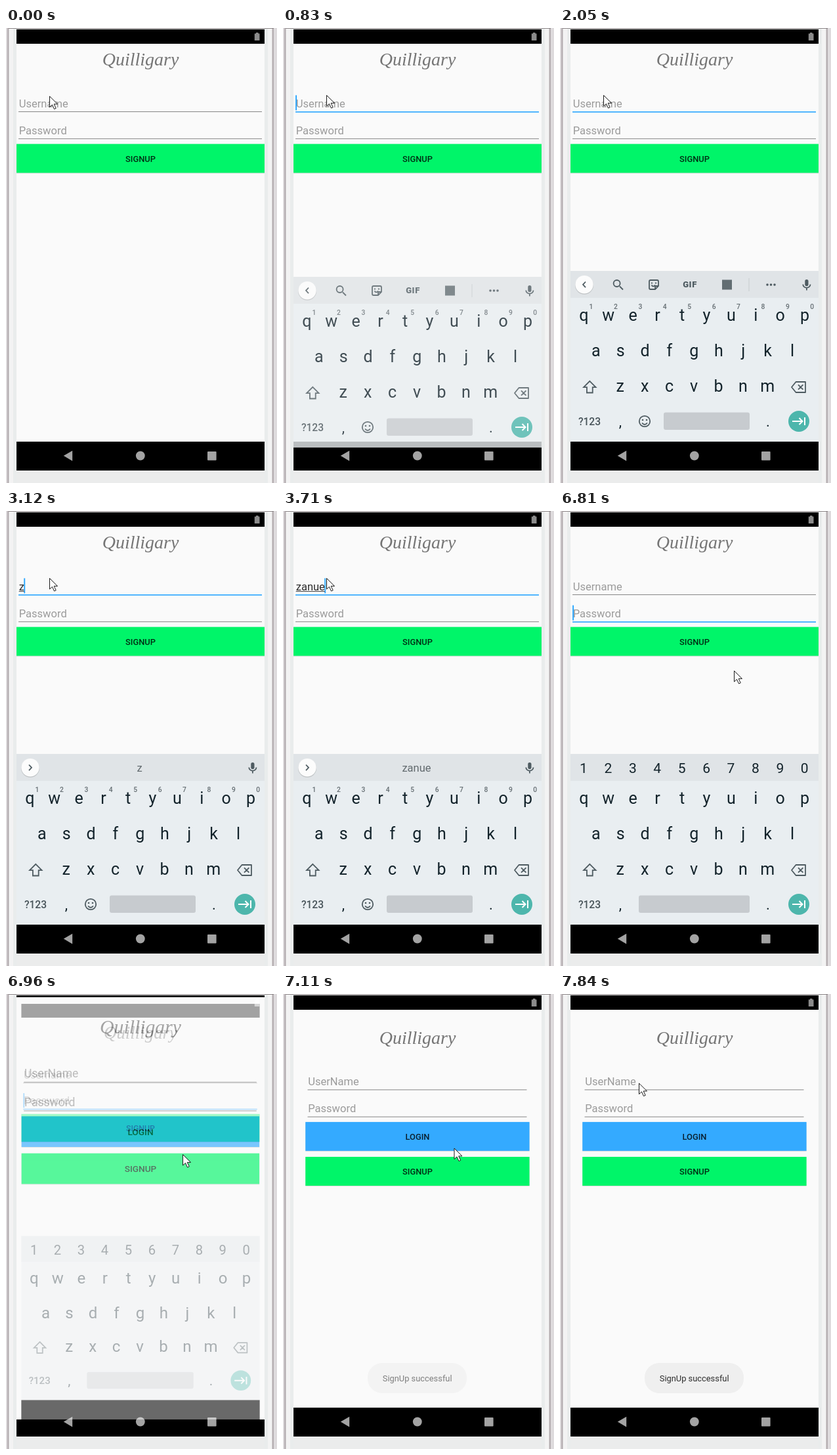
Animation, 413 px wide and 693 px high, one loop 7990 ms. Source, as an HTML page:

```html
<!DOCTYPE html>
<html lang="en">
<head>
<meta charset="utf-8">
<title>Sign-up flow</title>
<style>
  html, body { margin: 0; width: 100%; height: 100%; overflow: hidden; background: #f2f2f2; }
  svg { display: block; width: 100%; height: 100%; }
  text { font-family: Roboto, sans-serif; white-space: pre; }
  .mid { text-anchor: middle; }
  .medium { font-weight: 500; }
  .title { font: italic 28px "Liberation Serif", serif; }
  .icon { fill: none; stroke: #4e5b61; stroke-width: 1.8; }
</style>
</head>
<body>
<svg id="stage" viewBox="0 0 413 693"></svg>
<script>
const LOOP = 7990;
const ACCENT = '#34aaff', GREEN = '#00f569', PAPER = '#fafafa', INK = '#13232b', ICON = '#4e5b61';
const USER = 'zanue';
const FIELD_SIZE = 16.54, LEFT = 19.7;

const rect = (x, y, w, h, fill, more = '') =>
  `<rect x="${x}" y="${y}" width="${w}" height="${h}" fill="${fill}" ${more}/>`;
const text = (x, y, str, size, fill, more = '') =>
  `<text x="${x}" y="${y}" font-size="${size}" fill="${fill}" ${more}>${str}</text>`;
const mid = (x, y, str, size, fill, cls = '', more = '') =>
  text(x, y, str, size, fill, `class="mid ${cls}" ${more}`);
const dot = (x, y, r, fill) => `<circle cx="${x}" cy="${y}" r="${r}" fill="${fill}"/>`;
const icon = (d, more = '') => `<path class="icon" d="${d}" ${more}/>`;
const group = (id, body) => `<g id="${id}">${body}</g>`;

// Phone body
function phone() {
  const bands = [[0, 2, '#dedbdd'], [2, 2, '#b4adb0'], [4, 1, '#d8d4d6'], [5, 6, '#f3f3f3'], [11, 5, '#e9ecec']];
  return rect(0, 0, 413, 693, '#efefef') +
    bands.map(([x, w, c]) => rect(x, 0, w, 693, c) + rect(410 - x - w, 0, w, 693, c)).join('') +
    rect(410, 0, 3, 693, '#dedbdd') + rect(16, 674, 378, 19, '#ebecec') +
    rect(4, 0, 404, 1, '#8d8789');
}

// App screens
const windowBack = rect(16, 2, 378, 22, '#000') + rect(16, 24, 378, 606, PAPER) + rect(16, 630, 378, 44, '#000');
const title = y => mid(205, y, 'Quilligary', 28, '#757575', 'title');

function button(x, y, w, label, fill) {
  return rect(x, y + 1, w, 44, '#000', 'opacity=".12"') + rect(x, y, w, 44, fill) +
    mid(205, y + 26.9, label, 12.86, 'rgba(0,0,0,.82)', 'medium');
}

function field(id, x, lineY, width, hint) {
  return text(x + .7, lineY - 6.5, hint, FIELD_SIZE, '#9b9b9b', `id="${id}Hint"`) +
    text(x + .7, lineY - 6.5, '', FIELD_SIZE, '#2c2c2c', `id="${id}Text"`) +
    rect(x, lineY, width, 1, '#868686', `id="${id}Line"`) +
    rect(x, lineY - 24.6, 2, 23, ACCENT, `id="${id}Caret"`);
}

const signup = windowBack + title(57) +
  field('user', 19, 127, 371, 'Username') + rect(LEFT, 122, 0, 1, '#444', 'id="compose"') +
  field('pass', 19, 168.2, 371, 'Password') +
  button(16, 176.6, 378, 'SIGNUP', GREEN);

const login = windowBack + title(75.5) +
  field('name', 37.5, 145.4, 334, 'UserName') + field('code', 37.5, 186.6, 334, 'Password') +
  button(34.2, 194.9, 341.4, 'LOGIN', ACCENT) + button(34.2, 248, 341.4, 'SIGNUP', GREEN);

const toast = rect(129, 562, 151, 46, '#efefef', 'rx="22"') +
  mid(204.7, 589.8, 'SignUp successful', 12.86, '#2d2d2d');

// Keyboard
const PITCH = 37.42;
const row = (letters, x, y, size, fill = INK, cls = '') =>
  [...letters].map((c, i) => mid(x + i * PITCH, y, c, size, fill, cls)).join('');
const chevronDisc = dot(37, 391.8, 14, 'rgba(0,0,0,.15)') + dot(37, 390.7, 13.7, '#fcfcfc');

const mic = rect(373.3, 383, 5.2, 10, ICON, 'rx="2.6"') +
  icon('M370.3 390.5a5.6 5.2 0 0 0 11.2 0M375.9 396v3.5');

const tools = icon('M39 386.5l-4 4.3 4 4.3') +
  icon('M91 393.5l5 5M91.6 389a5 5 0 1 0-10 0a5 5 0 1 0 10 0') +
  icon('M138 384h10a2 2 0 0 1 2 2v7l-5 5h-7a2 2 0 0 1-2-2v-10a2 2 0 0 1 2-2zM150 393h-5v5M139.5 391.5q2.5 4 5.5 0M140 387.6v1.8M146 387.6v1.8') +
  mid(198, 395.3, 'GIF', 13, ICON, '', 'font-weight="900" letter-spacing=".6"') +
  rect(247, 383.5, 15, 15, '#626d72') + rect(287.5, 381, 1, 20, '#c6cbce') +
  [316, 321.5, 327].map(x => dot(x, 391, 1.8, ICON)).join('');

const suggestion = icon('M35 386.5l4 4.3-4 4.3') + mid(203.5, 396.8, '', 16.5, '#626a6e', '', 'id="word"');

const smiley = '<circle class="icon" cx="129" cy="599" r="8.2"/>' + icon('M125 601.5q4 5 8 0') +
  dot(126, 597, 1.3, ICON) + dot(132, 597, 1.3, ICON);

const keyboard = rect(16, 370, 378, 260, '#e9eef1') + rect(16, 370, 378, 41, '#e0e4e7') +
  rect(16, 630, 378, 44, '#000') +
  group('strip', chevronDisc + mic + group('tools', tools) + group('suggest', suggestion)) +
  group('digits', row('1234567890', 36, 399.3, 21)) +
  group('hints', row('1234567890', 47.5, 427.6, 10.3, '#656e73', 'medium')) +
  row('qwertyuiop', 36.3, 445.5, 25) + row('asdfghjkl', 54.7, 500, 25) + row('zxcvbnm', 91.8, 554, 25) +
  icon('M45.3 537.8l9.2 9.3h-4.8v8.4h-8.8v-8.4h-4.8z') +
  icon('M359.5 539h14.5v16h-14.5l-6.5-8zM363 543.3l7.4 7.4M370.4 543.3l-7.4 7.4', 'stroke-linejoin="round"') +
  mid(45, 604.6, '?123', 15.6, '#49555b', 'medium') + mid(92, 607, ',', 22, INK) + mid(317, 607, '.', 22, INK) +
  group('smiley', smiley) + rect(158, 585.5, 131, 26.5, '#c7cbcf', 'rx="3" id="space"') +
  dot(364, 599, 16, '#4db6ac') +
  icon('M354 599h15M364.5 594l5 5-5 5M373 593v12', 'style="stroke:#fff;stroke-width:2"');

const systemIcons = '<g fill="#fff" opacity=".64">' +
  '<path opacity=".85" d="M378.8 8.5h2.2V7h3.5v1.5h2V19h-7.7z"/>' +
  '<path d="M87.8 651.6l13.4-7.8v15.6z"/><circle cx="204.8" cy="651.5" r="6.9"/>' +
  '<rect x="307" y="645" width="13.6" height="13.6" rx="1"/></g>';

const pointer = '<path id="pointer" d="M0 0v16.5l4-3.6 3 6.6 2.7-1.2-3-6.4h5.3z" fill="#fff" stroke="#1a1a1a"/>';

document.getElementById('stage').innerHTML =
  '<clipPath id="screen"><rect x="16" y="2" width="378" height="672"/></clipPath>' + phone() +
  `<g clip-path="url(#screen)">${rect(16, 2, 378, 672, '#000')}` +
  group('login', login) + group('signup', signup) + group('ime', keyboard) +
  `${group('toast', toast)}${systemIcons}</g>${pointer}`;

// Timelines: each value holds until the next time
const timelines = {
  focus: [[0, ''], [530, 'user'], [4330, 'pass']],
  caret: [[0, 1], [1150, 0], [1610, 1], [2050, 0], [2660, 1], [4790, 0], [5090, 1], [6110, 0], [6530, 1]],
  typed: [[0, 0], [3120, 1], [3270, 2], [3420, 3], [3560, 4], [3710, 5], [6810, 0]],
  secret: [[0, ''], [5090, '1'], [5240, '••3'], [5530, '•••4'], [6810, '']],
  ime: [[0, [0, 0]], [830, [9, .8]], [1150, [0, 1]]],
  closing: [[0, 0], [6960, 1], [7110, 2]],
  toast: [[0, 0], [7110, .6], [7260, 1]],
  pointer: [[0, [66.5, 104]], [830, [66.5, 102.5]], [6110, [76, 113]], [6250, [97, 143]], [6390, [122, 177]],
    [6530, [137.5, 198]], [6810, [265.5, 243.5]], [6960, [269.5, 244.5]], [7110, [261, 235]], [7260, [226, 206]],
    [7400, [180, 172]], [7550, [142, 146]], [7700, [123, 137]], [7840, [120.5, 136]]]
};
const at = (name, t) => timelines[name].findLast(([time]) => time <= t)[1];

const el = id => document.getElementById(id);
const show = (id, on) => { el(id).style.display = on ? '' : 'none'; };
const attrs = (id, values) => { for (const key in values) el(id).setAttribute(key, values[key]); };
const zoom = s => `translate(205 335) scale(${s}) translate(-205 -335)`;

function drawField(id, value, focused, caretOn) {
  el(id + 'Text').textContent = value;
  show(id + 'Hint', !value);
  attrs(id + 'Line', { height: focused ? 1.7 : 1, fill: focused ? ACCENT : '#868686' });
  show(id + 'Caret', focused && caretOn);
  const width = value ? el(id + 'Text').getComputedTextLength() : 0;
  attrs(id + 'Caret', { x: LEFT - .7 + width });
  return width;
}

function draw(t) {
  const focus = at('focus', t), caret = at('caret', t), closing = at('closing', t);
  const name = USER.slice(0, at('typed', t));
  const onPassword = focus === 'pass';

  show('signup', closing < 2);
  const width = drawField('user', name, focus === 'user', caret);
  drawField('pass', at('secret', t), onPassword, caret);
  attrs('compose', { width: onPassword ? 0 : width });

  const [drop, alpha] = at('ime', t);
  show('ime', alpha && closing < 2);
  show('strip', !onPassword);
  show('tools', !name);
  show('suggest', name);
  show('digits', onPassword);
  show('hints', !onPassword);
  show('smiley', !onPassword);
  el('word').textContent = name;
  attrs('space', onPassword ? { x: 120, width: 169 } : { x: 158, width: 131 });

  const leaving = closing === 1;
  attrs('login', { transform: zoom(leaving ? 1.0616 : 1) });
  attrs('signup', { transform: zoom(leaving ? .961 : 1), opacity: leaving ? .35 : 1 });
  attrs('ime', { transform: leaving ? zoom(.961) : `translate(0 ${drop})`, opacity: leaving ? .35 : alpha });
  attrs('toast', { opacity: at('toast', t) });
  attrs('pointer', { transform: `translate(${at('pointer', t)})` });
}

['nameCaret', 'codeCaret'].forEach(id => show(id, false));
const start = performance.now();
function tick() {
  draw((performance.now() - start) % LOOP);
  requestAnimationFrame(tick);
}
tick();
</script>
</body>
</html>
```
